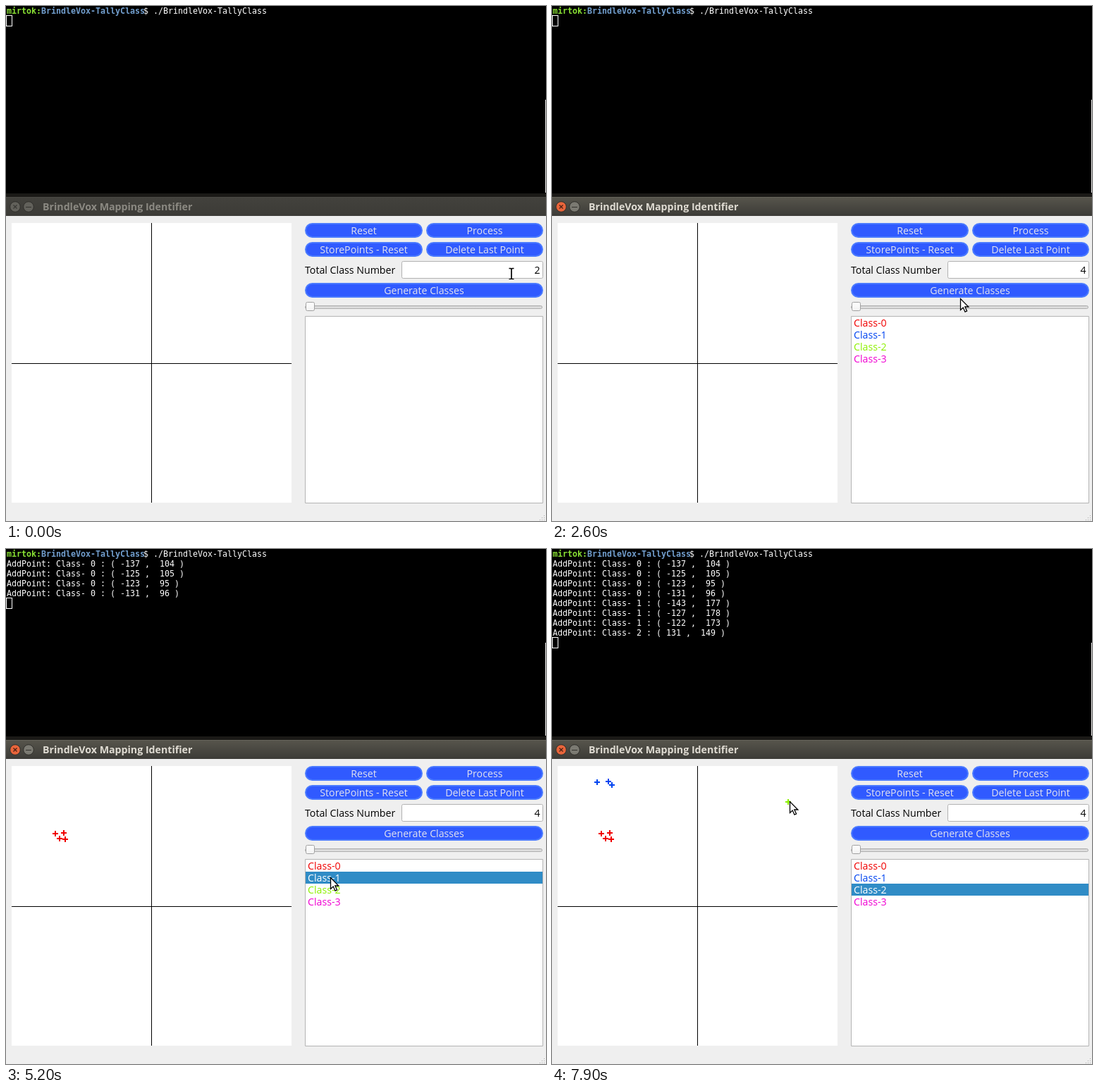
An HTML page with a canvas that plays this animation: 766x731 px, repeating every 8 s.

```html
<!DOCTYPE html>
<html>
<head>
<meta charset="utf-8">
<style>
html, body { margin: 0; width: 100%; height: 100%; overflow: hidden; background: #000; }
canvas { display: block; }
</style>
</head>
<body>
<canvas id="stage" width="766" height="731"></canvas>
<script>
const LOOP = 8000;
const g = document.getElementById('stage').getContext('2d');
const UI = '14.2px "Open Sans", "Noto Sans", sans-serif';
const MONO = '11.63px "DejaVu Sans Mono", monospace';
const APP = 'BrindleVox-TallyClass';
const COLORS = ['#f00000', '#0044f0', '#8cf000', '#f000d2'];

// What the user does, in ms
const FOCUS = 630, SELECT = 980, TYPE = 1330, GENERATE = 2530;
const PICKS = [3000, 5200, 7375];
const POINTS = [
  { at: 4100, cls: 0, px: -137, py: 104 },
  { at: 4200, cls: 0, px: -125, py: 105 },
  { at: 4310, cls: 0, px: -123, py: 95 },
  { at: 4420, cls: 0, px: -131, py: 96 },
  { at: 6350, cls: 1, px: -143, py: 177 },
  { at: 6500, cls: 1, px: -127, py: 178 },
  { at: 6610, cls: 1, px: -122, py: 173 },
  { at: 7900, cls: 2, px: 131, py: 149 }
].map(p => ({ ...p, x: Math.floor(206 + p.px * 0.99), y: Math.floor(507 - p.py * 0.99) }));

const stop = (at, x, y) => ({ at, x, y });

// The pointer visits these stops and every added point
const PATH = [
  stop(0, 717, 380), stop(FOCUS, 725, 379), stop(SELECT, 740, 379),
  stop(TYPE, 764, 381), stop(2150, 619, 391), stop(GENERATE, 598, 409),
  stop(PICKS[0], 470, 452), stop(3430, 138, 408), stop(3730, 79, 413),
  stop(4530, 80, 407), stop(PICKS[1], 460, 466), stop(5950, 128, 326),
  stop(6950, 420, 414), stop(PICKS[2], 455, 482),
  ...POINTS.map(p => stop(p.at, p.x + 2, p.y - 1))
].sort((a, b) => a.at - b.at);

function pointerAt(t) {
  const i = PATH.findIndex(p => p.at > t);
  if (i < 0) return PATH[PATH.length - 1];
  const a = PATH[i - 1], b = PATH[i];
  const k = (t - a.at) / (b.at - a.at);
  return { x: Math.round(a.x + (b.x - a.x) * k), y: Math.round(a.y + (b.y - a.y) * k) };
}

function rect(x, y, w, h, fill) {
  g.fillStyle = fill;
  g.fillRect(x, y, w, h);
}

function round(x, y, w, h, r, fill, stroke, line = 1) {
  g.beginPath();
  g.roundRect(x + line / 2, y + line / 2, w - line, h - line, r);
  g.fillStyle = fill;
  g.fill();
  g.strokeStyle = stroke;
  g.lineWidth = line;
  g.stroke();
}

function text(s, x, y, color, font = '500 ' + UI, align = 'left') {
  g.font = font;
  g.textAlign = align;
  g.fillStyle = color;
  g.fillText(s, x, y);
}

function gradient(y0, y1, top, bottom) {
  const fill = g.createLinearGradient(0, y0, 0, y1);
  fill.addColorStop(0, top);
  fill.addColorStop(1, bottom);
  return fill;
}

function terminal(points) {
  rect(0, 0, 766, 266, '#000');
  text('mirtok:', 1, 11, '#8ae234', 'bold ' + MONO);
  text(APP, 50, 11, '#729fcf', 'bold ' + MONO);
  text('$ ./' + APP, 195, 11, '#fff', MONO);
  points.forEach((p, i) =>
    text(`AddPoint: Class- ${p.cls} : ( ${p.px} ,  ${p.py} )`, 1, 25 + 14 * i, '#fff', MONO));
  g.strokeStyle = '#fff';
  g.lineWidth = 1;
  g.strokeRect(0.5, 13.5 + 14 * points.length, 8, 15);
  rect(765, 133, 1, 132, '#f2f1f0');
}

function disc(x, fill) {
  g.beginPath();
  g.arc(x, 285, 7.3, 0, 7);
  g.fillStyle = fill;
  g.fill();
  g.strokeStyle = '#302f2b';
  g.lineWidth = 1;
  g.stroke();
}

function titleBar(active) {
  rect(0, 266, 766, 5, '#1b1a17');
  rect(0, 271, 766, 27, gradient(271, 298, active ? '#57554c' : '#43423d', '#3c3b37'));
  rect(0, 271, 766, 1, active ? '#66645b' : '#4b4a45');
  disc(13, active ? '#e9653b' : '#62615b');
  disc(32, active ? '#7b7a72' : '#62615b');
  g.strokeStyle = active ? '#4a2014' : '#3a3935';
  g.lineWidth = 1.3;
  g.stroke(new Path2D('M10.5 282.5l5 5m0-5l-5 5'));
  rect(28, 285, 8, 1, '#33322e');
  text('BrindleVox Mapping Identifier', 52, 290, active ? '#dfdbd2' : '#8b8982', 'bold ' + UI);
}

function plot(points) {
  rect(8, 308, 397, 397, '#fff');
  rect(206, 308, 1, 397, '#000');
  rect(8, 507, 397, 1, '#000');
  for (const { x, y, cls } of points) {
    rect(x - 4, y - 1, 8, 2, COLORS[cls]);
    rect(x - 1, y - 4, 2, 8, COLORS[cls]);
  }
}

function button(label, x, y, w, hover = false) {
  round(x, y, w, 21, 9.5, hover ? '#4a70ff' : '#305aff', '#4a7aff', 2);
  text(label, x + w / 2, y + 16, '#e2e2ee', UI, 'center');
}

function field(t) {
  const focus = t >= FOCUS && t < GENERATE;
  const picked = t >= SELECT && t < TYPE;
  round(561, 362, 201, 25, 2, '#fff', focus ? '#306f9e' : '#b2b2b2');
  if (picked) rect(749, 367, 9, 16, '#308cc6');
  text(t < TYPE ? '2' : '4', 757.5, 380, picked ? '#fff' : '#000', '500 ' + UI, 'right');
  const blinkOn = (t - (t < TYPE ? FOCUS : TYPE)) % 1200 < 600;
  if (focus && !picked && blinkOn) rect(t < TYPE ? 749 : 757, 367, 1, 16, '#000');
}

function classList(t) {
  round(424, 440, 338, 266, 0, '#fff', '#b4b4b4');
  if (t < GENERATE) return;
  const chosen = PICKS.filter(at => at <= t).length - 1;
  COLORS.forEach((color, i) => {
    if (i === chosen) rect(425, 441 + 17 * i, 336, 17, '#308cc6');
    text('Class-' + i, 428, 455 + 17 * i, i === chosen ? '#fff' : color);
  });
}

function slider() {
  round(424, 425, 337, 5, 2, gradient(425, 430, '#cfcfcf', '#e6e6e6'), '#adadad');
  round(425, 420, 13, 13, 2, gradient(420, 433, '#ffffff', '#f1f1f1'), '#a0a0a0');
}

function beam(x, y) {
  const shape = new Path2D(`M${x - 3.5} ${y - 7.5}h2.5l1 1l1-1h2.5M${x} ${y - 6.5}v13M${x - 3.5} ${y + 7.5}h2.5l1-1l1 1h2.5`);
  for (const [w, color] of [[3.6, '#fff'], [1.7, '#000']]) {
    g.lineWidth = w;
    g.strokeStyle = color;
    g.stroke(shape);
  }
}

function arrow(x, y) {
  const shape = new Path2D(`M${x + 0.5} ${y + 0.5}v16l3.7-3.5l2.8 6.2l2.6-1.2l-2.8-6h5z`);
  g.lineWidth = 1.3;
  g.fillStyle = '#fff';
  g.fill(shape);
  g.strokeStyle = '#000';
  g.stroke(shape);
}

function grip() {
  for (let i = 0; i < 3; i++)
    for (let j = 0; j <= i; j++) rect(763 - 3 * j, 723 + 3 * i, 1, 1, '#a8a8a8');
}

function draw(t) {
  const { x, y } = pointerAt(t);
  const over = (left, top, w, h) => x > left && x < left + w && y > top && y < top + h;
  const points = POINTS.filter(p => p.at <= t);
  terminal(points);
  rect(0, 298, 766, 433, '#efefef');
  titleBar(t >= FOCUS);
  plot(points);
  button('Reset', 424, 308, 167);
  button('Process', 596, 308, 166);
  button('StorePoints - Reset', 424, 335, 167);
  button('Delete Last Point', 596, 335, 166);
  text('Total Class Number', 424, 380, '#000');
  field(t);
  button('Generate Classes', 424, 393, 338, over(424, 393, 338, 21));
  slider();
  classList(t);
  grip();
  (over(561, 362, 201, 25) ? beam : arrow)(x, y);
}

const start = performance.now();
function tick() {
  draw((performance.now() - start) % LOOP);
  requestAnimationFrame(tick);
}
tick();
</script>
</body>
</html>
```
